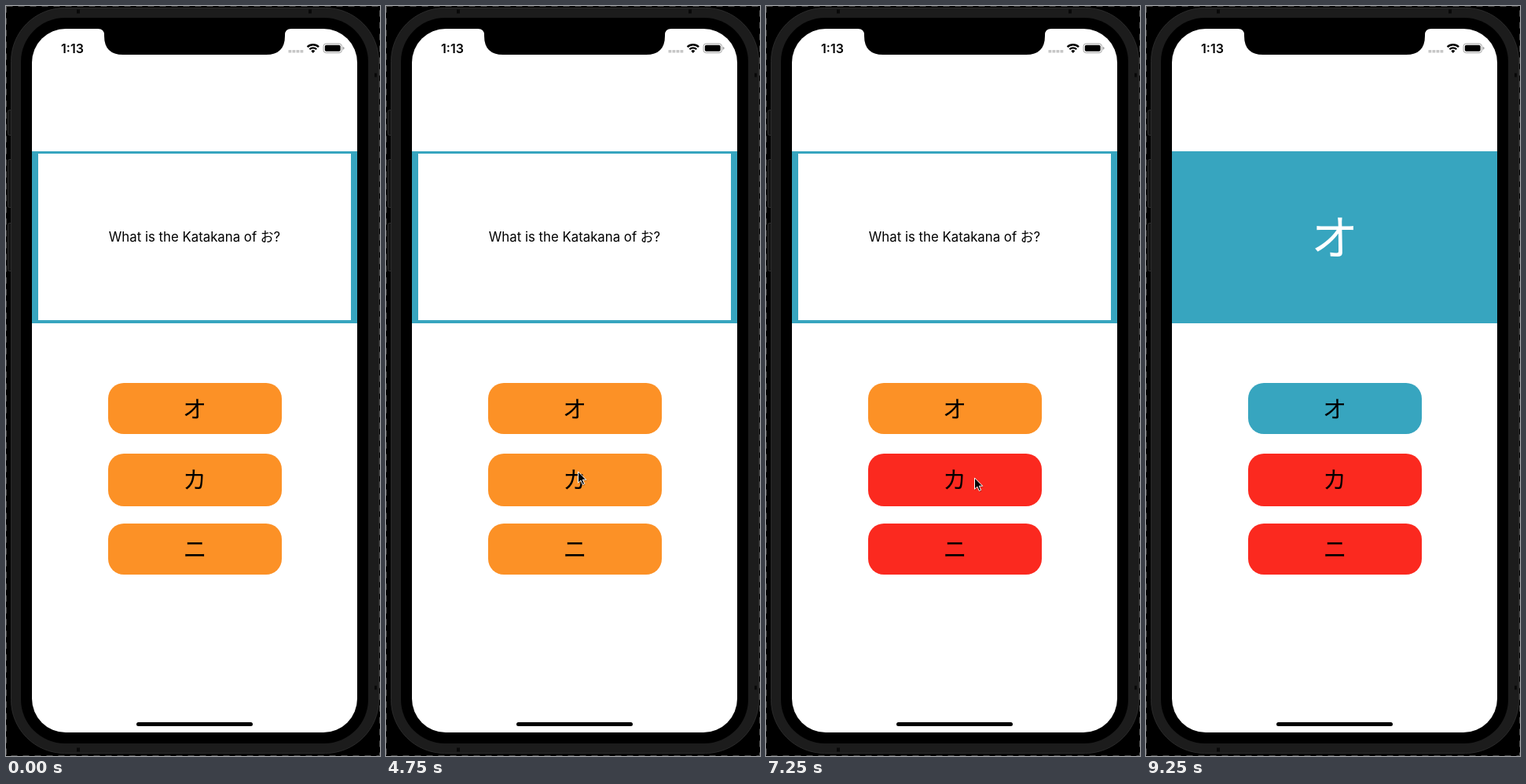
Write an HTML page that moves like this. It is 476 px wide and 955 px high and loops after 10000 ms.

```html
<!DOCTYPE html>
<html lang="en">
<head>
<meta charset="utf-8">
<title>Katakana quiz</title>
<style>
  html, body { margin: 0; width: 100%; height: 100%; overflow: hidden; background: #000; }
  svg { display: block; width: 476px; height: 955px; }
  text { font-family: Inter, "Noto Sans CJK JP", "Noto Sans CJK", sans-serif; text-anchor: middle; }
  .kana { font-family: "Noto Sans CJK JP", "Noto Sans CJK", sans-serif; font-size: 30px; }
  #bigKana { font-size: 60px; }
</style>
</head>
<body>
<svg viewBox="0 0 476 955">
  <rect width="476" height="955"/>
  <rect x=".5" y=".5" width="475" height="954" fill="none" stroke="#484848" stroke-dasharray="8 7"/>

  <!-- phone body -->
  <g fill="#141414" stroke="#303030">
    <rect x="2.5" y="132.5" width="6" height="32" rx="2"/>
    <rect x="2.5" y="195.5" width="6" height="61" rx="2"/>
    <rect x="2.5" y="276.5" width="6" height="61" rx="2"/>
    <rect x="6.5" y="2.5" width="468" height="949" rx="68" fill="#1c1c1c" stroke="#2b2b2b"/>
  </g>
  <rect x="19" y="15" width="442" height="924" rx="56"/>
  <path d="M90 7h4M385 7h4M90 947h4M469 88h3M469 868h3" stroke="#080808" stroke-width="5"/>
  <rect x="33" y="29" width="414" height="896" rx="43" fill="#fff"/>
  <path d="M117 29Q125 29 125 37V38Q125 62 149 62H331Q355 62 355 38V37Q355 29 363 29V28H117Z"/>

  <!-- status bar -->
  <text x="84.5" y="59.6" font-size="16" font-weight="600">1:13</text>
  <path d="M359.5 57.7H379" stroke="#c6c6c6" stroke-width="3.6" stroke-dasharray="3.8 1.2"/>
  <g fill="none" stroke="#000" stroke-width="2.4">
    <path d="M383.6 52.2a10.2 10.2 0 0 1 14.4 0M386.4 55.2a6.2 6.2 0 0 1 8.8 0"/>
    <path d="M388.3 57.3a3.6 3.6 0 0 1 5 0L390.8 60Z" fill="#000" stroke="none"/>
  </g>
  <rect x="404" y="48" width="23.5" height="11.6" rx="3.4" fill="none" stroke="#a0a0a0"/>
  <rect x="405.8" y="49.8" width="19.9" height="8" rx="1.8"/>
  <path d="M428.8 51.8q1.8 .6 1.8 2t-1.8 2z" fill="#999"/>

  <!-- card -->
  <rect x="33" y="185" width="414" height="219" fill="#37a5bf"/>
  <rect id="cardFace" x="41" y="188" width="398" height="212"/>
  <text id="question" x="240" y="300" font-size="16.8">What is the Katakana of お?</text>
  <text id="bigKana" class="kana" x="240" y="316.8">オ</text>

  <!-- answers -->
  <g id="answers">
    <rect x="130" y="480" width="221" height="65" rx="20"/>
    <rect x="130" y="570" width="221" height="67" rx="20"/>
    <rect x="130" y="659" width="221" height="65" rx="20"/>
  </g>
  <text id="firstKana" class="kana" x="240" y="524.2">オ</text>
  <text class="kana" x="240" y="614.2">カ</text>
  <text class="kana" x="240.5" y="702.4">ニ</text>

  <rect x="166" y="912" width="148" height="5" rx="2.5"/>

  <g id="cursor">
    <path d="M1 2V17L4.6 13.7L7 19L9.6 17.8L7.3 12.7H12Z" fill="#000" opacity=".22"/>
    <path d="M.5 .9V15.2L3.9 12L6.3 17.4L8.6 16.4L6.3 11.2H10.7Z" stroke="#fff" stroke-linejoin="round"/>
  </g>
</svg>
<script>
const $ = id => document.getElementById(id);
const ORANGE = '#fc9126', RED = '#fb291f', TEAL = '#37a5bf';
const LOOP = 10000;

// [time, x, y] of the pointer tip; it jumps from stop to stop
const stops = [
  [500, 322, 196], [750, 281, 274], [4250, 234, 446], [4500, 226, 546],
  [4750, 244, 592], [5250, 244, 597], [5500, 238, 599], [5750, 242, 593],
  [6000, 261, 684], [6250, 266, 709], [7250, 265, 600], [7500, 265, 530],
  [8000, 263, 528], [8750, 265, 529], [9000, 311, 367]
];
const buttons = $('answers').children;

function show(el, visible) {
  el.setAttribute('visibility', visible ? 'visible' : 'hidden');
}

function render(t) {
  const solved = t >= 8250;
  const flipped = solved || (t >= 2000 && t < 3500);
  show($('question'), !flipped);
  show($('bigKana'), flipped);
  $('bigKana').setAttribute('fill', solved ? '#fff' : '#000');
  $('cardFace').setAttribute('fill', solved ? TEAL : '#fff');

  const colors = [solved ? TEAL : ORANGE, t >= 5250 ? RED : ORANGE, t >= 6750 ? RED : ORANGE];
  colors.forEach((color, i) => buttons[i].setAttribute('fill', color));
  $('firstKana').setAttribute('opacity', t >= 8000 && !solved ? .78 : 1);

  const stop = stops.filter(([time]) => time <= t).pop();
  show($('cursor'), stop && t < 9250);
  if (stop) $('cursor').setAttribute('transform', `translate(${stop[1]} ${stop[2]})`);
}

function tick() {
  render(performance.now() % LOOP);
  requestAnimationFrame(tick);
}
tick();
</script>
</body>
</html>
```
